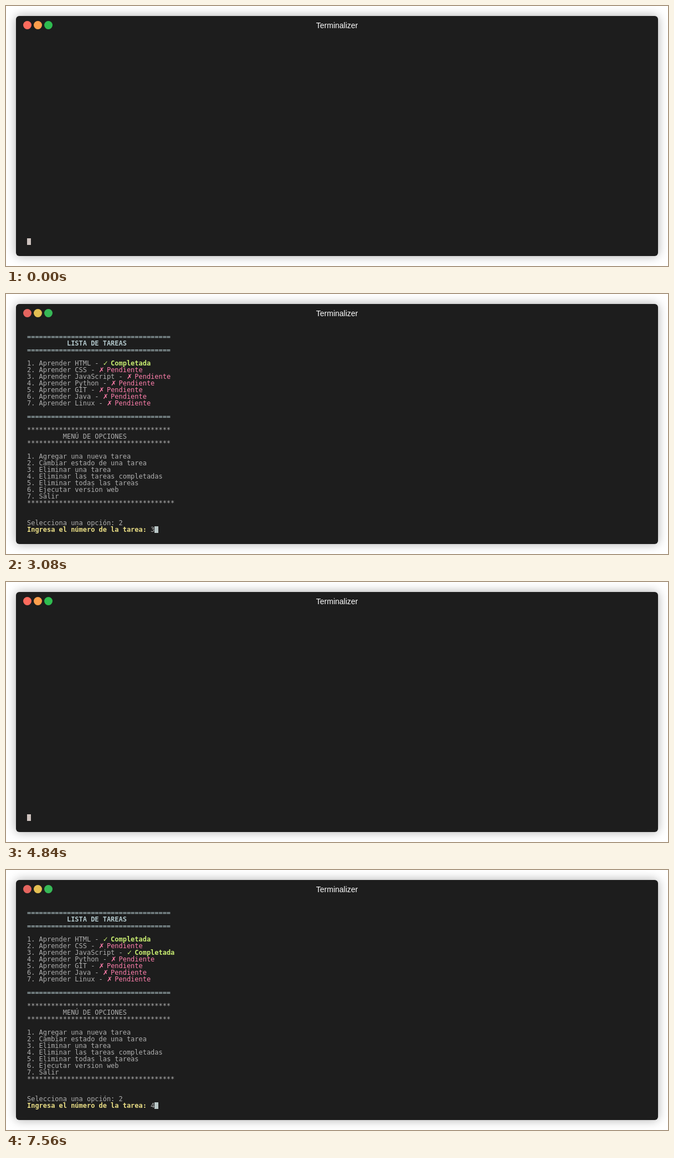
Write an HTML page that moves like this. It is 1195x469 px and loops after 8 s.

```html
<!DOCTYPE html>
<html lang="es">
<head>
<meta charset="utf-8">
<title>Lista de tareas</title>
<style>
html, body { margin: 0; width: 100%; height: 100%; overflow: hidden; background: #fff; }
#win {
  position: absolute; left: 18px; top: 18px; width: 1159px; height: 433px;
  border-radius: 6px; background: #1d1d1d; box-shadow: 0 0 18px rgba(0, 0, 0, .33);
}
#title {
  position: absolute; left: 0; right: 0; top: 8px; text-align: center; color: #fff;
  font: 14px/18px "Liberation Sans", Arial, sans-serif;
}
.dot { position: absolute; top: 9px; width: 15px; height: 15px; border-radius: 50%; }
.screen { position: absolute; inset: 0; opacity: 0; }
.row {
  position: absolute; left: 20px; height: 12px; white-space: pre; color: #afafaf;
  font: 11.96px/12px "DejaVu Sans Mono", "Noto Sans Mono", monospace;
}
.rule { color: #b1c6ca; }
.head { color: #b1c6ca; font-weight: bold; }
.done { color: #c8ed71; font-weight: bold; }
.todo { color: #ff7fac; }
.ask { color: #ebdf86; font-weight: bold; }
.mark { display: inline-block; width: 7.2px; height: 12px; vertical-align: top; font-family: "DejaVu Sans", sans-serif; }
.cursor { position: absolute; width: 7px; height: 12px; background: #b9c6c6; }
.blank .cursor { background: #cdc2be; }
</style>
</head>
<body>
<div id="win"><div id="title">Terminalizer</div></div>
<script>
const LOOP = 8000, CELL = 7.2, LINE = 12, TOP = 53, LEFT = 20, ROWS = 30;
const win = document.getElementById('win');
const span = (cls, text) => `<span class="${cls}">${text}</span>`;
const topics = ['HTML', 'CSS', 'JavaScript', 'Python', 'GIT', 'Java', 'Linux'];
const options = ['Agregar una nueva tarea', 'Cambiar estado de una tarea', 'Eliminar una tarea',
  'Eliminar las tareas completadas', 'Eliminar todas las tareas', 'Ejecutar version web', 'Salir'];

function status(done) {
  const cls = done ? 'done' : 'todo';
  return span(cls, span('mark', done ? '✓' : '✗') + (done ? ' Completada' : ' Pendiente'));
}

function menu(done) {
  const rule = span('rule', '='.repeat(36)), stars = '*'.repeat(36);
  return [
    rule, span('head', ' '.repeat(10) + 'LISTA DE TAREAS'), rule, '',
    ...topics.map((t, i) => `${i + 1}. Aprender ${t} - ${status(done.includes(t))}`),
    '', rule, '', stars, ' '.repeat(9) + 'MENÚ DE OPCIONES', stars, '',
    ...options.map((o, i) => `${i + 1}. ${o}`),
    stars + '*', '', ''
  ];
}

const pick = 'Selecciona una opción: ';
const ask = span('ask', 'Ingresa el número de la tarea:') + ' ';
const before = menu(['HTML']), after = menu(['HTML', 'JavaScript']);
const blank = Array(ROWS).fill('');
const marked = 'Tarea "Aprender JavaScript" marcada como "Completada".';

// start time, lines (the last one holds the cursor), cursor column
const steps = [
  [0, blank, 0],
  [100, [...before, pick], 23],
  [1600, [...before, pick + 2], 24],
  [1860, [...before, pick + 2, ''], 0],
  [1880, [...before, pick + 2, ask], 31],
  [3080, [...before, pick + 2, ask + 3], 32],
  [3320, [...before, pick + 2, ask + 3, ''], 0],
  [3340, [...before, pick + 2, ask + 3, marked, ''], 0],
  [4840, blank, 0],
  [4940, [...after, pick], 23],
  [5880, [...after, pick + 2], 24],
  [6340, [...after, pick + 2, ''], 0],
  [6360, [...after, pick + 2, ask], 31],
  [7560, [...after, pick + 2, ask + 4], 32]
];

function draw(lines, col) {
  const shown = lines.slice(-ROWS), empty = lines === blank;
  const dots = empty ? ['#fd6b5d', '#fd9f4c', '#2fbd50'] : ['#e5655f', '#e3bf52', '#37b957'];
  const el = document.createElement('div');
  el.className = empty ? 'screen blank' : 'screen';
  el.innerHTML =
    dots.map((c, i) => `<div class="dot" style="left:${13 + i * 18.75}px;background:${c}"></div>`).join('') +
    shown.map((s, i) => s && `<div class="row" style="top:${TOP + i * LINE}px">${s}</div>`).join('') +
    `<div class="cursor" style="left:${LEFT + col * CELL}px;top:${TOP + (shown.length - 1) * LINE}px"></div>`;
  return win.appendChild(el);
}

steps.forEach(([start, lines, col], i) => {
  const end = i + 1 < steps.length ? steps[i + 1][0] : LOOP;
  const key = (time, opacity) => ({ offset: time / LOOP, opacity, easing: 'step-end' });
  const keys = [key(start, 1), key(end, end < LOOP ? 0 : 1)];
  if (start > 0) keys.unshift(key(0, 0));
  if (end < LOOP) keys.push(key(LOOP, 0));
  draw(lines, col).animate(keys, { duration: LOOP, iterations: Infinity });
});
</script>
</body>
</html>
```
